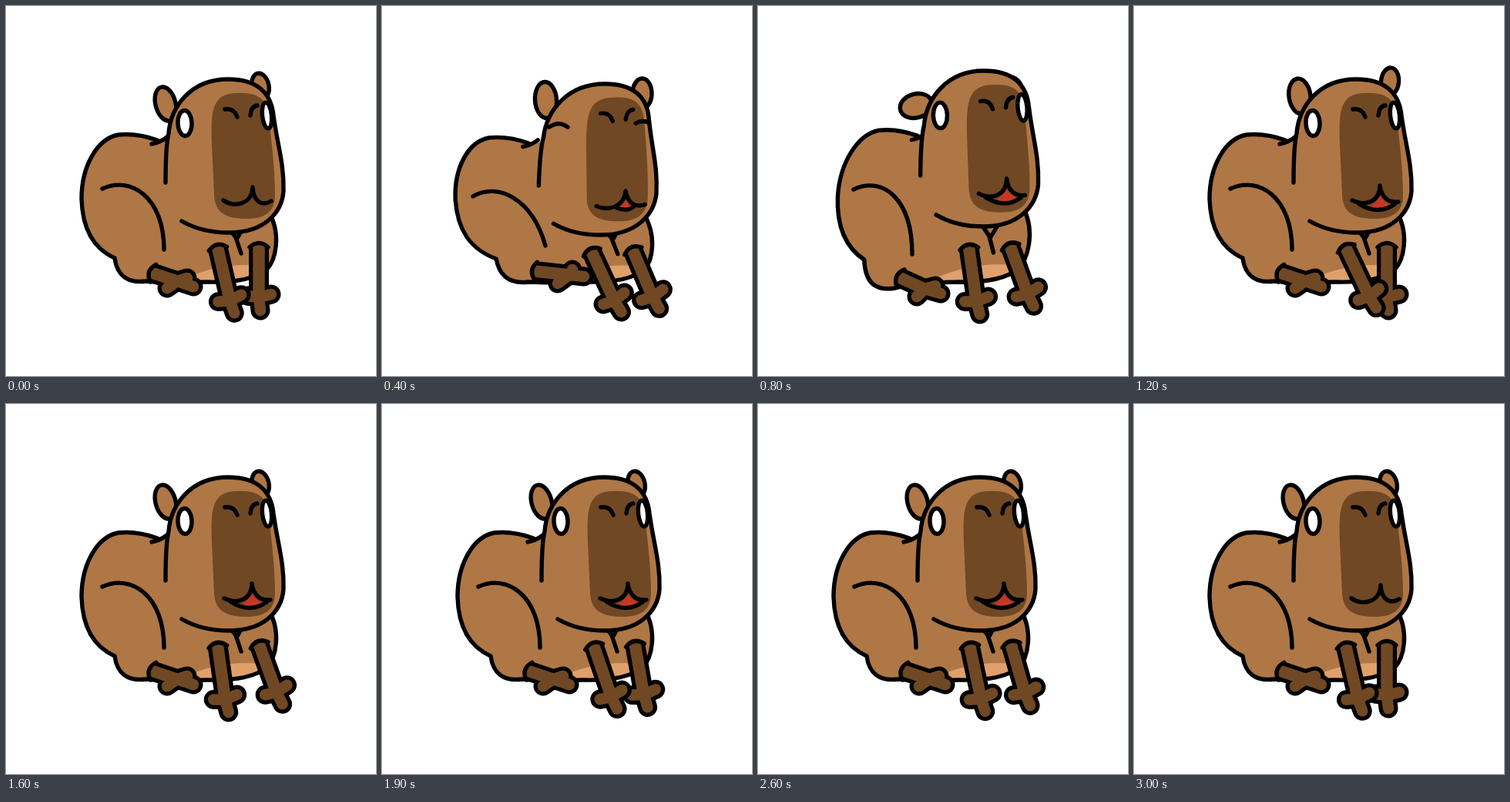
An HTML page with a canvas for the animation above (3.2 s loop, 480 by 480 pixels).

```html
<!DOCTYPE html>
<html lang="en">
<head>
<meta charset="utf-8">
<title>Capybara</title>
<style>
html, body { margin: 0; width: 100%; height: 100%; overflow: hidden; background: #fff; }
canvas { display: block; width: 480px; height: 480px; }
</style>
</head>
<body>
<canvas id="stage" width="480" height="480"></canvas>
<script>
const ctx = document.getElementById('stage').getContext('2d');
const LOOP = 3200;
const FUR = '#af7745', DARK = '#704824', BELLY = '#dfa06c', RED = '#c93724', INK = '#000';
const LINE = 5.4;
const rad = deg => deg * Math.PI / 180;
const mix = (a, b, k) => a.map((v, i) => v + (b[i] - v) * k);
const path = d => new Path2D(d);

// Back, rump and underside; the rump bulge shifts by x, y
const torso = (x, y) => `C182 169 166 165 146 167 C118 172 98 208 98 250 C99 287 112 314 ${141 + x} ${327 + y / 3} ` +
  `C${144 + x} ${350 + y} ${158 + x} ${360 + y} ${182 + x} ${357 + y} C205 359 230 359 260 358 ` +
  'C295 359 322 355 338 342 C350 330 358 296 340 265';
const NECK = path('M189 179 Q200 177 209 170 M288 287 L298 300 L305 321 M299 303 L308 287');
const PATCH = path('M235 352 Q283 332 331 337 L331 362 L235 362 Z');
const HEAD = path('M207 229 C207 200 208 178 211 165 C214 130 240 95 288 95 C325 95 344 112 347 142 ' +
  'C352 180 361 205 360 240 C358 268 335 294 290 294 C265 294 245 289 228 279');
const MUZZLE = path('M267 180 C266 140 265 113 300 113 C325 112 338 118 341 145 C345 180 349 215 349 245 ' +
  'C349 268 335 276 312 276 C285 276 271 268 270 245 Z');
const NOSE = path('M284 134 Q296 132 300 144 M317 142 Q318 130 326 129');
const SHUT_EYES = path('M218 152 Q230 143 242 152 M330 147 Q338 142 347 146');
const MOUTHS = {
  closed: { lines: path('M282 252 C295 262 319 258 320 235 C321 255 333 260 344 253') },
  small: {
    lines: path('M283 256 C298 263 319 257 320 236 C323 250 331 259 346 254 M309 258 Q321 264 331 257'),
    tongue: path('M321 248 Q316 255 312 258 Q321 263 329 257 Q325 255 321 248 Z')
  },
  open: {
    lines: path('M283 252 C299 260 319 255 319 233 C321 248 330 256 343 254 M292 257 Q317 272 338 257'),
    tongue: path('M319 246 Q315 255 307 259 Q320 267 333 258 Q323 254 319 246 Z')
  }
};

// Ears as x, y, rx, ry, tilt
const EARS = {
  rest: [[207, 127, 13, 22.5, -15], [330, 104, 11, 17, -12]],
  low: [[212.5, 122, 14, 23.5, -4], [337.5, 113.5, 12.5, 19.5, 0]],
  droop: [[205, 129.5, 21, 15.5, -15], [333, 104, 8, 12, -30]],
  perk: [[215, 117, 14, 23, -8], [332, 98, 11.5, 18, 5]]
};

// Values for squashed, resting and stretched
const RIG = {
  head: [[-6, 3, .985, -.035], [0, 0, 1, 0], [3, -8, 1.015, -.01]],
  body: [[-1, .05, .98], [0, 0, 1], [3, -.07, 1.03]],
  rump: [[6, 1], [0, 0], [-3, 9]],
  shoulder: [[-3, 5], [0, 0], [-1, 0]],
  haunch: [
    [118, 247, 150, 228, 195, 250, 212, 311],
    [125, 237, 162, 220, 205, 248, 205, 316],
    [124, 238, 162, 220, 200, 250, 200, 322]
  ],
  foot: [
    [198, 344, 243, 349, 228, 360, 247, 342, 262, 351],
    [189, 346, 222, 357, 209, 366, 235, 353, 243, 364],
    [183, 352, 216, 367, 206, 377, 230, 363, 237, 373]
  ]
};
const rig = (part, b) => {
  const [down, mid, up] = RIG[part];
  return b < 0 ? mix(mid, down, -b) : mix(mid, up, b);
};

// time, bounce, left and right leg angle, eyes open, mouth, ears from, to, blend
const POSES = [
  [0, 0, 13, 0, 1, 'closed', 'rest', 'rest', 0],
  [200, -.5, 20, 9, 1, 'closed', 'rest', 'low', .5],
  [400, -1, 25, 23, 0, 'small', 'low', 'low', 0],
  [600, -.3, 16, 29, 0, 'small', 'rest', 'low', .4],
  [800, 1, 8, 20, 1, 'open', 'droop', 'droop', 0],
  [900, 1.1, 11, 17, 1, 'open', 'droop', 'rest', .2],
  [1000, .4, 19, 10, 1, 'open', 'rest', 'perk', .3],
  [1200, 0, 25.5, 0, 1, 'open', 'perk', 'perk', 0],
  [1400, 0, 19, 10, 1, 'open', 'rest', 'perk', .5],
  [1500, 0, 12, 16, 1, 'open', 'rest', 'rest', 0],
  [1600, 0, 8, 20, 1, 'open', 'rest', 'rest', 0],
  [1800, 0, 12, 16, 1, 'open', 'rest', 'rest', 0],
  [1900, 0, 19, 10, 1, 'open', 'rest', 'rest', 0],
  [2000, 0, 25.5, 0, 1, 'open', 'rest', 'rest', 0],
  [2100, 0, 23, 4, 1, 'open', 'rest', 'rest', 0],
  [2200, 0, 19, 10, 1, 'open', 'rest', 'rest', 0],
  [2300, 0, 12, 16, 1, 'open', 'rest', 'rest', 0],
  [2400, 0, 8, 20, 1, 'open', 'rest', 'rest', 0],
  [2600, 0, 12, 16, 1, 'open', 'rest', 'rest', 0],
  [2700, 0, 19, 10, 1, 'open', 'rest', 'rest', 0],
  [2800, 0, 25.5, 0, 1, 'open', 'rest', 'rest', 0],
  [3000, 0, 13, 0, 1, 'closed', 'rest', 'rest', 0]
];

function stroke(p, width = LINE) {
  ctx.strokeStyle = INK;
  ctx.lineWidth = width;
  ctx.stroke(p);
}

function fill(p, color) {
  ctx.fillStyle = color;
  ctx.fill(p);
}

function oval([x, y, rx, ry, tilt], color) {
  const p = new Path2D();
  p.ellipse(x, y, rx, ry, rad(tilt), 0, Math.PI * 2);
  fill(p, color);
  stroke(p);
}

// Leg with three toes: base, paw centre, then toe centres
function limb([bx, by, cx, cy, ...toes]) {
  const leg = new Path2D(), paw = new Path2D();
  leg.moveTo(bx, by);
  leg.lineTo(cx, cy);
  for (let i = 0; i < toes.length; i += 2) {
    paw.moveTo(cx, cy);
    paw.lineTo(toes[i], toes[i + 1]);
  }
  for (const [color, legWidth, toeWidth] of [[INK, 26, 25], [DARK, 15.5, 14.5]]) {
    ctx.strokeStyle = color;
    ctx.lineCap = 'butt';
    ctx.lineWidth = legWidth;
    ctx.stroke(leg);
    ctx.lineCap = 'round';
    ctx.lineWidth = toeWidth;
    ctx.stroke(paw);
  }
  const cap = path('M-12 2 Q0 -9 12 2');
  ctx.save();
  ctx.translate(bx, by);
  ctx.rotate(Math.atan2(cy - by, cx - bx) - Math.PI / 2);
  fill(cap, DARK);
  stroke(cap);
  ctx.restore();
}

function frontLeg(x, y, length, deg) {
  const s = Math.sin(rad(deg)), c = Math.cos(rad(deg));
  const at = (across, along) => [x + across * c + along * s, y - across * s + along * c];
  limb([x, y, ...at(0, length), ...at(-15, length - 2), ...at(16, length - 4), ...at(2, length + 17)]);
}

function drawBody(b) {
  const [dx, shear, sy] = rig('body', b);
  const outline = torso(...rig('rump', b));
  const body = path('M207 171 L196 173 ' + outline + ' L280 200 Z');
  const [hx, hy, ...bend] = rig('haunch', b);
  ctx.save();
  ctx.transform(1, 0, shear, sy, dx - shear * 285, 358 * (1 - sy));
  fill(body, FUR);
  ctx.save();
  ctx.clip(body);
  fill(PATCH, BELLY);
  ctx.restore();
  stroke(path('M196 174 ' + outline));
  stroke(NECK);
  ctx.restore();
  stroke(path(`M${hx} ${hy} C${bend.join(' ')}`));
}

function drawHead(b, open, mouth) {
  const [dx, dy, sy, skew] = rig('head', b);
  const { lines, tongue } = MOUTHS[mouth];
  ctx.save();
  ctx.transform(1, 0, skew, sy, dx - skew * 294, dy + 294 * (1 - sy));
  fill(HEAD, FUR);
  fill(MUZZLE, DARK);
  stroke(HEAD);
  if (open) {
    oval([232, 152, 9, 16.5, -2], '#fff');
    oval([338.5, 142, 6, 17, -6], '#fff');
  } else {
    stroke(SHUT_EYES);
  }
  stroke(NOSE);
  if (tongue) fill(tongue, RED);
  stroke(lines);
  ctx.restore();
}

function draw(time) {
  const [, b, left, right, open, mouth, from, to, k] = POSES.filter(p => p[0] <= time).pop();
  ctx.fillStyle = '#fff';
  ctx.fillRect(0, 0, 480, 480);
  ctx.lineCap = ctx.lineJoin = 'round';
  EARS[from].forEach((ear, i) => oval(mix(ear, EARS[to][i], k), FUR));
  drawBody(b);
  drawHead(b, open, mouth);
  limb(rig('foot', b));
  const [sx, sy] = rig('shoulder', b);
  frontLeg(328 + sx, 311 + sy, 67, right);
  frontLeg(274.5 + sx, 313 + sy, 71, left);
}

const start = performance.now();
function tick() {
  draw((performance.now() - start) % LOOP);
  requestAnimationFrame(tick);
}
tick();
</script>
</body>
</html>
```
